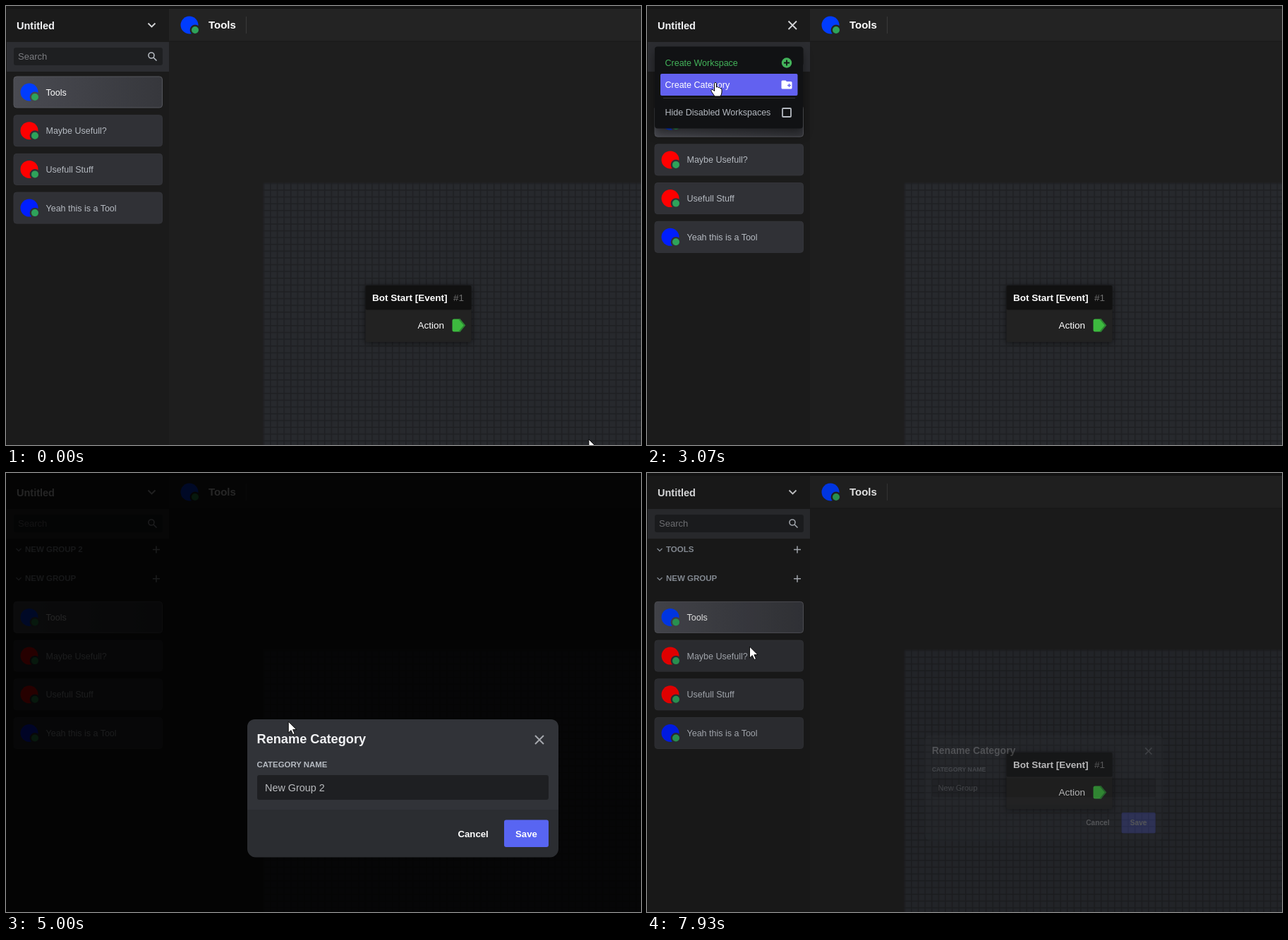
An HTML page for the animation above (8 s loop, 900 by 622 pixels).

```html
<!DOCTYPE html>
<html lang="en">
<head>
<meta charset="utf-8">
<title>Workspace categories</title>
<style>
html, body { margin: 0; height: 100%; overflow: hidden; background: #1e1e1e; }
svg { display: block; width: 100vw; height: 100vh; font: 12.5px "Liberation Sans", Arial, sans-serif; white-space: pre; }
.b { font-weight: bold; }
.line { fill: none; stroke: #d5d6d8; stroke-width: 1.8; }
.popup { filter: drop-shadow(0 7px 7px #0007); }
</style>
</head>
<body>
<svg viewBox="0 0 900 622">
  <defs>
    <pattern id="grid" x="364.5" y="250.5" width="9.6" height="9.6" patternUnits="userSpaceOnUse">
      <rect width="9.6" height="9.6" fill="#27292d"/>
      <path d="M0 .8H9.6M.8 0V9.6" stroke="#1f2023" stroke-width="1.6"/>
    </pattern>
    <linearGradient id="active"><stop stop-color="#4a4b52"/><stop offset="1" stop-color="#36373c"/></linearGradient>
  </defs>

  <!-- editor -->
  <rect width="900" height="622" fill="#1e1e1e"/>
  <rect x="364.5" y="250.5" width="536" height="372" fill="url(#grid)"/>
  <rect x="231" y="4" width="669" height="46" fill="#232323"/>
  <path d="M231 50H900" stroke="#191919"/>
  <g id="badge"></g>
  <text class="b" x="287" y="31.5" font-size="15" fill="#fff">Tools</text>
  <path d="M340.5 15V39" stroke="#3a3a3a"/>
  <g style="filter:drop-shadow(0 1px 4px #0009)">
    <rect x="509.5" y="396" width="150" height="80" rx="2" fill="#222"/>
    <rect x="509.5" y="396" width="150" height="34.5" rx="2" fill="#111"/>
  </g>
  <g font-size="13.5" fill="#fff">
    <text class="b" x="519" y="418">Bot Start [Event]</text>
    <text x="634" y="418" fill="#707070">#1</text>
    <text x="583.5" y="457">Action</text>
  </g>
  <path d="M635 443.5H642.5L650 452.5 642.5 461.5H635Q632.5 461.5 632.5 459V446Q632.5 443.5 635 443.5Z" fill="#3dba3f"/>
  <path d="M642.5 443.5L650 452.5 642.5 461.5" fill="none" stroke="#2d8433" stroke-width="2"/>

  <!-- sidebar -->
  <rect width="231" height="622" fill="#1b1b1b"/>
  <rect width="900" height="4" fill="#151515"/>
  <path d="M.5 4V622" stroke="#151515"/>
  <text class="b" x="15" y="32.5" font-size="14.5" fill="#f2f3f5">Untitled</text>
  <path id="toggle" class="line"/>
  <rect x="1" y="51" width="230" height="42" fill="#2c2d31"/>
  <rect x="11" y="59" width="211" height="25" rx="3" fill="#1e1f21"/>
  <text x="17" y="76" font-size="13" fill="#7b7c80">Search</text>
  <g fill="none" stroke="#b5bac1" stroke-width="1.6"><circle cx="206" cy="70" r="4"/><path d="M209 73L213.5 77.5"/></g>
  <g id="groups"></g>
  <g id="list"></g>

  <!-- workspace menu -->
  <g id="menu" class="popup">
    <rect x="11" y="57.5" width="210" height="116" rx="4" fill="#111214"/>
    <rect id="pick" x="19" y="96" width="194.5" height="31" rx="2" fill="#6261f0"/>
    <text x="25.5" y="85" fill="#43b35a">Create Workspace</text>
    <text id="pickText" x="25.5" y="116">Create Category</text>
    <text x="25.5" y="155" fill="#b5bac1">Hide Disabled Workspaces</text>
    <circle cx="198" cy="80.5" r="7.2" fill="#43b35a"/>
    <path d="M194 80.5H202M198 76.5V84.5" stroke="#111214" stroke-width="1.8"/>
    <path d="M192 105.5H196.500L198 107H204Q205.500 107 205.500 108.500V116Q205.500 117.500 204 117.500H192Q190.500 117.500 190.500 116V107Q190.500 105.500 192 105.500Z" fill="#fff"/>
    <path d="M199 112.500H204M201.500 110V115" stroke="#6261f0" stroke-width="1.300"/>
    <path d="M23 130.500H210" stroke="#35363a"/>
    <rect x="192" y="145" width="12" height="12" rx="1" class="line" style="stroke:#b5bac1"/>
  </g>

  <!-- category menu -->
  <g id="context" class="popup"></g>

  <!-- dialog -->
  <rect id="dim" width="900" height="622"/>
  <g id="dialog">
    <rect x="342" y="349" width="441" height="195.500" rx="12" fill="#2b2d31"/>
    <path d="M342 477V361Q342 349 354 349H771Q783 349 783 361V477Z" fill="#313338"/>
    <text class="b" x="355.500" y="383" font-size="18.200" fill="#f2f3f5">Rename Category</text>
    <path d="M750 372L762 384M762 372L750 384" stroke="#a5a8ad" stroke-width="2"/>
    <text class="b" x="355.500" y="416.500" font-size="11.400" fill="#b5bac1">CATEGORY NAME</text>
    <rect x="356" y="428" width="413" height="35" rx="3" fill="#1e1f22"/>
    <rect id="select" x="367" y="437" width="85.500" height="16" fill="#2f69c5"/>
    <text id="field" x="367" y="450.500" font-size="14.400" fill="#b9bbbe"></text>
    <rect id="caret" y="437" width="1" height="17" fill="#dbdee1"/>
    <rect x="706" y="491.500" width="63" height="38.500" rx="3" fill="#5865f2"/>
    <g class="b" font-size="13.200" fill="#fff">
      <text x="640.500" y="515.500">Cancel</text>
      <text x="722" y="515.500">Save</text>
    </g>
  </g>

  <g id="pointer">
    <path id="arrow" d="M0 0V16L3.800 12.500 6.500 18.500 9 17.400 6.400 11.500H11.500Z" fill="#fff" stroke="#000" stroke-width=".9"/>
    <path id="hand" d="M-1.500 1.500Q0-1 1.500 1.500V7Q3 5.500 4 7.500 5.800 6.500 6.500 8.500 8.800 8 9 10.500V14Q9 17 7 20H-1L-5.500 13.500Q-7 11-5 10.200-3.500 10-1.500 12.500Z" fill="#fff" stroke="#000"/>
    <path id="beam" d="M-3-7.500H-1L0-6.500 1-7.500H3M0-6.500V6.500M-3 7.500H-1L0 6.500 1 7.500H3" fill="none" stroke="#ddd"/>
  </g>
</svg>
<script>
const $ = id => document.getElementById(id);
const set = (id, attrs) => { for (const k in attrs) $(id).setAttribute(k, attrs[k]); };
const clamp = v => Math.max(0, Math.min(1, v));
const STEP = 200 / 3, STEPS = 120;

const avatar = (x, y, color, ring) =>
  `<circle cx="${x}" cy="${y}" r="12.5" fill="${color}"/>
   <circle cx="${x + 8}" cy="${y + 7}" r="6.2" fill="#2ea35a" stroke="${ring}" stroke-width="2.4"/>`;

$('badge').innerHTML = avatar(260, 27, '#003cff', '#232323');
$('list').innerHTML = [['Tools', '#003cff'], ['Maybe Usefull?', '#f00'], ['Usefull Stuff', '#f00'], ['Yeah this is a Tool', '#001eff']]
  .map(([name, color], i) => `<g transform="translate(0 ${99.5 + i * 54.7})">
    <rect x="11" y=".5" width="210.5" height="44" rx="4" fill="${i ? '#303136' : 'url(#active)'}" stroke="${i ? '#34353a' : '#55565c'}"/>
    ${avatar(33, 22.5, color, i ? '#303136' : '#46474d')}
    <text x="56.5" y="27" fill="${i ? '#b5bac1' : '#fff'}">${name}</text></g>`).join('');

const groupRow = (name, y, hover) => `<g transform="translate(0 ${y})">
  <path d="M14.5 -1L18 2.500 21.500 -1" fill="none" stroke="#949ba4" stroke-width="1.300"/>
  <text class="b" x="27" y="4" font-size="11.500" fill="${hover ? '#dbdee1' : '#949ba4'}">${name}</text>
  <path d="M208 .5H218M213-4.500V5.500" stroke="#b5bac1" stroke-width="1.500"/></g>`;

const contextItems = [['Create Workspace', 7], ['Create Category', 38], ['Rename Category', 78], ['Move Category', 109], ['Delete Category', 140]];
const contextMenu = picked => `<rect width="165" height="180" rx="4" fill="#111214"/>
  <path d="M12 73.500H153" stroke="#35363a"/>` + contextItems.map(([name, y], i) =>
  (picked && i == 2 ? `<rect x="8" y="${y}" width="149" height="31" rx="2" fill="#6261f0"/>` : '') +
  `<text x="14" y="${y + 20}" fill="${i == 0 ? '#43b35a' : i == 4 ? '#d8484c' : picked && i == 2 ? '#fff' : '#b5bac1'}">${name}</text>`).join('');

// pointer stops: step, x, y
const path = [[0, 826, 614], [9, 200, 35], [23, 200, 35], [29, 122, 112], [33, 122, 112], [36, 198, 35], [40, 198, 35],
  [46, 97, 108], [49, 97, 108], [53, 84, 115], [55, 84, 115], [59, 120, 181], [61, 120, 181], [67, 171, 199],
  [71, 171, 199], [78, 549, 451.5], [102, 549, 451.5], [108, 51, 138], [111, 51, 138], [116, 145.500, 246], [120, 145.500, 246]];

function pointerAt(n) {
  const i = path.findIndex(p => p[0] > n), [a, x, y] = path[i - 1], [b, u, v] = path[i];
  const p = (n - a) / (b - a), e = p * p * (3 - 2 * p);
  return [x + (u - x) * e, y + (v - y) * e];
}

// visibility of a popup opened at step a and closed at step b
const pop = (n, a, b) => Math.min(clamp((n - a + 1) / 3), clamp((b + 2 - n) / 3));

function draw(n) {
  const [x, y] = pointerAt(n);

  const m = Math.max(pop(n, 14, 33), pop(n, 39, 49));
  const open = n >= 14 && n < 34 || n >= 39 && n < 50;
  set('toggle', { d: open ? 'M200.500 21.500L212 33M212 21.500L200.500 33' : 'M201.500 24.500L206.500 29.500 211.500 24.500' });
  const s = .85 + .15 * m;
  set('menu', { opacity: m, transform: `translate(116 57) scale(${s}) translate(-116 -57)` });
  const over = y > 96 && y < 127;
  set('pick', { opacity: +over });
  set('pickText', { fill: over ? '#fff' : '#b5bac1' });

  const count = (n >= 34) + (n >= 50), second = n > 100;
  const context = n >= 55 && n < 70 || n >= 111 && n < 119;
  set('list', { transform: `translate(0 ${count * 41.200})` });
  const names = count > 1 ? [n < 96 ? 'NEW GROUP 2' : 'TOOLS', 'NEW GROUP'] : ['NEW GROUP'].slice(0, count);
  $('groups').innerHTML = names.map((t, i) => groupRow(t, 108 + i * 41.200, context && i == +second)).join('');

  const since = second ? 111 : 55;
  $('context').innerHTML = contextMenu(y > (second ? 215 : 193));
  set('context', {
    opacity: context ? clamp((n - since + 1) / 3) : 0,
    transform: second ? 'translate(51 137)' : 'translate(84 115)'
  });

  const p = n >= 70 && n < 96 ? clamp((n - 70) / 4.500) : clamp((n - 118) / 4.500);
  const z = .7 + .3 * p;
  set('dim', { opacity: .85 * p ** 1.300 });
  set('dialog', { opacity: p, transform: `translate(562.500 446.500) scale(${z}) translate(-562.500 -446.500)` });
  const typed = n < 87 ? 1 : n < 89 ? 3 : n < 91 ? 4 : 5;
  $('field').textContent = second ? 'New Group' : n < 85 ? 'New Group 2' : 'Tools'.slice(0, typed);
  set('select', { opacity: +(n >= 81 && n < 85) });
  set('caret', { opacity: +(n >= 85 && n < 96), x: 367.500 + $('field').getComputedTextLength() });

  const beam = n >= 77 && n < 96;
  const hand = !beam && (m > .5 || context || (x < 222 && y < 50));
  set('pointer', { transform: `translate(${x} ${y})` });
  set('beam', { opacity: +beam });
  set('hand', { opacity: +hand });
  set('arrow', { opacity: +!(beam || hand) });
}

const start = performance.now();
function tick() {
  const t = (performance.now() - start) % (STEP * STEPS);
  draw(Math.floor((t + 4) / STEP) % STEPS);
  requestAnimationFrame(tick);
}
tick();
</script>
</body>
</html>
```
